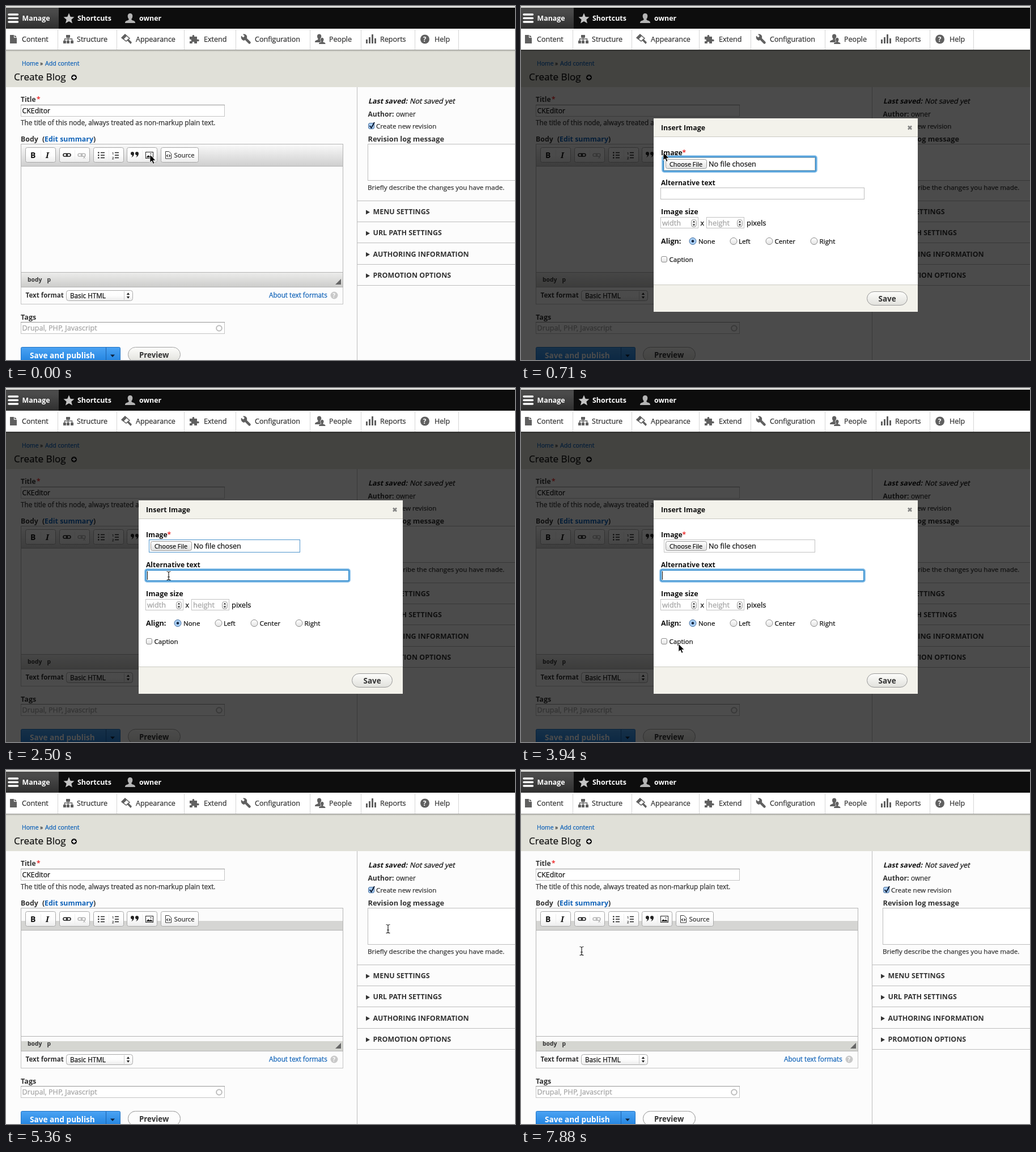
An HTML page that plays this animation: 898 px wide and 624 px high, repeating every 8000 ms.

```html
<!DOCTYPE html>
<html lang="en">
<head>
<meta charset="utf-8">
<title>Insert image dialog</title>
<style>
  html, body { margin: 0; width: 100%; height: 100%; overflow: hidden; background: #fcfcfc; }
  svg { display: block; }
  text {
    font-family: "Open Sans", "Noto Sans", sans-serif; white-space: pre;
    color: #333; fill: currentColor; stroke: currentColor; stroke-width: .25px;
  }
  .b { font-weight: 700; stroke: none; }
  .k { color: #111; }
  .w { color: #fff; }
  .link { color: #0f62b8; }
  .hint { color: #a3a3a3; }
  .req { color: #e33; }
</style>
</head>
<body>
<svg id="stage" width="898" height="624" viewBox="0 0 898 624"></svg>
<script>
const text = (x, y, size, str, cls = '', extra = '') =>
  `<text x="${x}" y="${y}" font-size="${size}" class="${cls}" ${extra}>${str}</text>`;
const bold = (x, y, size, str, cls = '') => text(x, y, size, str, 'b ' + cls);
const slant = (x, y, size, str, cls) => text(0, 0, size, str, cls, `transform="translate(${x} ${y}) skewX(-13)"`);
const rect = (x, y, w, h, fill, extra = '') =>
  `<rect x="${x}" y="${y}" width="${w}" height="${h}" fill="${fill}" ${extra}/>`;
// bordered box whose 1px outline sits on whole pixels
const box = (x, y, w, h, fill, stroke, r = 0) =>
  rect(x + .5, y + .5, w - 1, h - 1, fill, `stroke="${stroke}" rx="${r}"`);
const path = (d, fill = 'none', extra = '') => `<path d="${d}" fill="${fill}" ${extra}/>`;
const line = (d, stroke, w = 1, extra = '') => path(d, 'none', `stroke="${stroke}" stroke-width="${w}" ${extra}`);
const circle = (x, y, r, fill, extra = '') => `<circle cx="${x}" cy="${y}" r="${r}" fill="${fill}" ${extra}/>`;
const group = (id, body) => `<g id="${id}">${body}</g>`;
const grad = (id, ...stops) => `<linearGradient id="${id}" x2="0" y2="1">` +
  stops.map(([at, c]) => `<stop offset="${at}" stop-color="${c}"/>`).join('') + '</linearGradient>';

const field = (x, y, w, h) => box(x, y, w, h, '#fff', '#c4c4c4') + line(`M${x} ${y + .5}h${w}`, '#969696');
const glow = (x, y, w, h) =>
  rect(x - 1, y - 1, w + 2, h + 2, 'none', 'stroke="#8fc3ea" stroke-width="4" rx="3"') +
  rect(x, y, w, h, 'none', 'stroke="#3f94d2" stroke-width="2" rx="1"');
const tick = (x, y) => line(`M${x + 2.5} ${y + 5}l3 3.8L${x + 11} ${y - 1}`, '#0b1b33', 2);
const checkbox = (x, y, on) => box(x, y, 11, 11, on ? '#a9cdf3' : 'url(#soft)', on ? '#4a6f9c' : '#8c8c8c', 2.5) + (on ? tick(x, y) : '');
const radio = (x, on) => circle(x, 414.5, 6, on ? '#a9cff5' : 'url(#soft)', `stroke="${on ? '#466f9f' : '#8c8c8c'}"`) +
  (on ? circle(x, 414.5, 2.3, '#10243e') : '');
const arrows = (x, y, s) => path(`M${x - s} ${y - 1.5}h${2 * s}l${-s} ${-s - 1}zM${x - s} ${y + 1.5}h${2 * s}l${-s} ${s + 1}z`, '#222');
const spinner = x => box(x, 376, 10, 14, 'url(#soft)', '#999', 4) + arrows(x + 5, 383, 2);

function topBar() {
  const nav = [[28, 'Content'], [125, 'Structure'], [229, 'Appearance'], [349, 'Extend'],
    [439, 'Configuration'], [570, 'People'], [660, 'Reports'], [756, 'Help']];
  const gray = '#606060';
  const person = (x, y, scale, c, extra = '') => path('M9 0c3 0 4.5 2 4.3 5c-.2 3-1.3 4-2 5c0 2 1.5 2 4 3c2 .8 2.7 1.8 2.7 4H0' +
    'c0-2.2.7-3.2 2.7-4c2.5-1 4-1 4-3c-.7-1-1.8-2-2-5C4.5 2 6 0 9 0z', c, `transform="translate(${x} ${y}) scale(${scale})" ${extra}`);
  const icons =
    path('M7 51h7v5h5v10H7zM15 51l4 4h-4z', gray) +
    path('M106 51h7v5h-7zM101 61h5v5h-5zM107 61h5v5h-5zM114 61h5v5h-5z', gray) +
    line('M109.5 55v6M103.5 61v-3h13v3', gray, 1.5) +
    line('M204 56l6-6 8 7-6 5z', gray, 1.5) + path('M204 56l6-6 3 3-6 6zM213 60l3-2 6 6-2 3z', gray) +
    path('M324 54h5c-2-4 5-4 3 0h5v5c5-2 5 5 0 3v4h-5c2-4-5-4-3 0h-5v-4c4 2 4-5 0-3z', gray) +
    line('M422 57l7.5 7.5', gray, 4.5, 'stroke-linecap="round"') +
    path('M415 52.5l3.5 3 2.5-2.5-3-3.2c4-1.2 8 1.8 7.2 6.2l-5 5c-3.5 0-6.500-4-5.2-8.5z', gray) +
    person(545, 49.5, .85, gray) + person(552, 56, .64, gray, 'stroke="#fff" stroke-width="2" paint-order="stroke"') +
    path('M635 59h3v7h-3zM640 55h3v11h-3zM645 50h3v16h-3zM650 57h3v9h-3z', gray) +
    circle(739, 58.5, 8, gray) + bold(735.7, 63, 12, '?', 'w');
  return rect(0, 0, 898, 3, '#dededb') + rect(0, 3, 898, 37, '#0d0d0d') + rect(0, 3, 93, 37, 'url(#tab)') +
    rect(0, 40, 898, 37, '#fff') +
    line('M91.5 41v36M195.5 41v36M314.5 41v36M405.5 41v36M536.5 41v36M626.5 41v36M721.5 41v36M798.5 41v36', '#d6d6d6') +
    line('M5 15h15.5M5 21.5h15.5M5 28h15.5', '#fff', 3.5, 'stroke-linecap="round"') +
    path('M111 12.5l2.7 6.5 6.8.5-5.2 4.4 1.7 6.7-6-3.6-6 3.6 1.7-6.7-5.2-4.4 6.8-.5z', '#c4c4c4') +
    person(210, 13, 1, '#b4b4b4') +
    bold(28.5, 26, 12.4, 'Manage', 'w') + bold(126, 26, 12.45, 'Shortcuts', 'w') + bold(235, 26, 12.4, 'owner', 'w') +
    icons + nav.map(([x, label]) => text(x, 62.5, 12.55, label)).join('');
}

function pageHeader() {
  return rect(0, 77, 898, 66, '#e0e0d8') + rect(0, 77, 898, 4, 'url(#shade)') +
    text(28, 105, 10.5, 'Home', 'link') + text(60, 105, 10.5, '»') + text(69, 105, 10.65, 'Add content', 'link') +
    text(14, 130.5, 17.1, 'Create Blog', 'k') +
    circle(120, 126, 5, '#111') + line('M117 126h6M120 123v6', '#fff', 1.8);
}

function editor() {
  const groups = [[34, 54], [94, 54], [154, 54], [213, 54], [273, 67]];
  const lines = [258.5, 263, 267.5];
  const chain = (x, c) => [0, 5.5].map(dx =>
    rect(x + dx, 260.2, 7.5, 4.8, 'none', `stroke="${c}" stroke-width="1.6" rx="2.4"`)).join('');
  const rows = x => lines.map(y => line(`M${x} ${y}h7`, '#222', 1.5)).join('');
  const picture = box(246, 257, 14, 12, '#fff', '#222') + path('M248 267v-1l3-3 2.5 2 2-1.5 3 2.5v1z', '#222') + circle(255.5, 260.5, 1, '#222');
  const pill = fill => box(215, 601, 93, 27, fill, '#a0a0a0', 13);
  const bars = rect(27, 244, 567, 38, 'url(#bar)') + rect(27, 470, 567, 25, 'url(#foot)') + pill('url(#pill)');
  const flatBars = rect(27, 244, 567, 38, 'url(#flatBar)') + rect(27, 470, 567, 25, 'url(#flatFoot)') + pill('#fdfdfd');
  return bold(26, 169, 12, 'Title') + bold(54, 169, 12, '*', 'req') +
    field(26, 174, 360, 21) + text(28.5, 189, 12.3, 'CKEditor', 'k') +
    text(26, 209.5, 11.83, 'The title of this node, always treated as non-markup plain text.') +
    bold(26, 238.5, 12.3, 'Body') + bold(64, 238.5, 12.4, '(') + bold(68, 238.5, 12.4, 'Edit summary', 'link') + bold(154, 238.5, 12.4, ')') +
    box(26, 243, 569, 283, '#fcfcfc', '#c4c4c4') + bars + group('flat', flatBars) +
    line('M26 243.5h569M26 282.5h569M26 469.5h569M26 495.5h569M26.5 243v252M594.5 243v252', '#b4b4b4') +
    groups.map(([x, w]) => box(x, 249, w, 27, 'url(#button)', '#a9a9a9', 3)).join('') +
    group('pressed', rect(240, 250, 26, 25, 'url(#down)')) +
    line('M61.5 254v17M121.5 254v17M181.5 254v17M240.5 254v17', '#eee') +
    bold(43, 267.5, 14, 'B', 'k') +
    text(70, 267.5, 14, 'I', 'b k', 'style="font-family:\'Noto Serif\',serif;font-style:italic"') +
    chain(101, '#222') + chain(127, '#b5b5b5') + line('M136 265l4 4M140 265l-4 4', '#b5b5b5') +
    rows(167) + lines.map(y => circle(163.3, y, 1.3, '#222')).join('') +
    rows(192) + text(187, 262, 6, '1') + text(187, 270, 6, '2') +
    path('M220 260a3 3 0 1 1 6 0q0 5-5 7q2-2 2-4q-3 0-3-3zM228 260a3 3 0 1 1 6 0q0 5-5 7q2-2 2-4q-3 0-3-3z', '#222') +
    picture +
    path('M281.5 256.5h6l4 4v8.5h-10z', '#fff', 'stroke="#333"') + line('M285.5 262l-2 2 2 2M287.5 262l2 2-2 2', '#222', 1.2) +
    text(296.5, 266.5, 11.3, 'Source') +
    bold(38, 486, 10.3, 'body') + bold(72.5, 486, 10.3, 'p') + path('M591 481v10h-10z', '#666') +
    bold(34.5, 514, 11.55, 'Text format') + box(106, 501, 118, 19, 'url(#button)', '#aaa', 4) +
    line('M208.5 503v15', '#ccc') + arrows(215.5, 510.5, 2.7) + text(113, 514.5, 11.7, 'Basic HTML', 'k') +
    text(464, 514, 11.72, 'About text formats', 'link') + circle(579, 510, 6.5, '#c9c9c9') + bold(576.3, 514, 10, '?', 'w') +
    bold(26, 552.5, 12.6, 'Tags') + field(26, 557, 360, 21) + text(28.5, 572, 12.65, 'Drupal, PHP, Javascript', 'hint') +
    circle(376, 568, 4.8, 'none', 'stroke="#bdbdbd" stroke-width="2"') +
    box(26, 601, 176, 30, 'url(#blue)', '#1e72c4', 2) + line('M176.5 602v22', '#1c62ad') +
    path('M184 614.5h8l-4 4.5z', '#0d2440') + bold(42, 621, 13.65, 'Save and publish', 'w') +
    bold(235, 619.5, 13.3, 'Preview');
}

function sidebar() {
  const sections = ['MENU SETTINGS', 'URL PATH SETTINGS', 'AUTHORING INFORMATION', 'PROMOTION OPTIONS'];
  return line('M619.5 143v481', '#bdbdbd') +
    slant(639, 172, 12.45, 'Last saved:', 'b k') + slant(712, 172, 12.55, 'Not saved yet', 'k') +
    bold(638.5, 194.5, 12.1, 'Author:') + text(688, 194.5, 11.8, 'owner') +
    checkbox(639, 206, true) + text(653, 216, 11.65, 'Create new revision') +
    bold(638.5, 238.5, 12.8, 'Revision log message') + box(638, 243, 270, 65, '#fff', '#bdbdbd') +
    text(638, 323.5, 11.65, 'Briefly describe the changes you have made.') +
    line('M619 343.5h279', '#bdbdbd') +
    sections.map((s, i) => {
      const y = 367 + i * 37.3;
      return path(`M635 ${y - 7.5}l7 4-7 4z`, '#333') + bold(647.5, y, 12.45, s) +
        line(`M619 ${Math.round(y + 13) + .5}h279`, '#bdbdbd');
    }).join('');
}

function dialog() {
  const aligns = [[303, 313, 'None'], [375, 384, 'Left'], [438, 447.5, 'Center'], [517, 526.5, 'Right']];
  return rect(0, 77, 898, 547, '#000', 'opacity=".7"') +
    rect(234, 198, 466, 341, '#fff') + rect(234, 198, 466, 32, '#f3f2eb') + rect(234, 492, 466, 47, '#f3f2eb') +
    line('M234 230.5h466M234 491.5h466', '#cbcac2') +
    bold(247, 219, 12.4, 'Insert Image', 'k') + line('M683 211.5l6 6M689 211.5l-6 6', '#858585', 2.6) +
    bold(247, 262.5, 12.3, 'Image', 'k') + bold(284.5, 262.5, 12, '*', 'req') +
    box(252, 267, 267, 23, '#fff', '#c2c2c2') +
    group('fileBlue', box(252, 267, 267, 23, 'none', '#4f95cc')) + group('fileGlow', glow(251, 266, 269, 25)) +
    box(255, 270, 73, 17, 'url(#soft)', '#999', 3) + text(262, 282.5, 10.9, 'Choose File', 'k') +
    text(331, 282.5, 12.65, 'No file chosen', 'k') +
    bold(247, 315.5, 12.1, 'Alternative text', 'k') + box(246, 320, 360, 21, '#fff', '#bdbdbd') +
    group('altGlow', glow(247, 321, 358, 19)) + group('caret', rect(249, 323, 1, 15, '#000')) +
    bold(247, 367, 12.6, 'Image size', 'k') +
    box(246, 372, 67, 20, '#fff', '#c2c2c2') + box(327, 372, 67, 20, '#fff', '#c2c2c2') +
    text(249, 387, 12.7, 'width', 'hint') + text(330, 387, 12.9, 'height', 'hint') + spinner(300) + spinner(381) +
    text(316.5, 387, 12.5, 'x', 'k') + text(398, 387, 12.9, 'pixels', 'k') +
    bold(247, 418.5, 12.6, 'Align:', 'k') +
    aligns.map(([cx, x, s], i) => radio(cx, i === 0) + text(x, 418.5, 11.65, s, 'k')).join('') +
    checkbox(247, 441, false) + group('checked', checkbox(247, 441, true)) + text(261.5, 450.5, 11.65, 'Caption', 'k') +
    box(610, 503, 72, 25, 'url(#pill)', '#999', 12.5) + bold(630.5, 521, 13.5, 'Save');
}

const defs = '<defs>' +
  grad('tab', [.2, '#4a4a4a'], [1, '#2f2f2f']) + grad('shade', [0, '#8c8c88'], [.4, '#c4c4bd'], [1, '#e0e0d8']) +
  grad('bar', [0, '#fafafa'], [.15, '#f3f3f3'], [1, '#cfcfcf']) + grad('foot', [0, '#ececeb'], [1, '#cdcdcb']) +
  grad('flatBar', [.57, '#fbfbfb'], [.57, '#d5d5d3']) + grad('flatFoot', [.34, '#fbfbfb'], [.34, '#d5d6d1']) +
  grad('button', [0, '#fff'], [.5, '#fdfdfd'], [1, '#ececec']) + grad('down', [0, '#c9c9c9'], [1, '#dedede']) +
  grad('soft', [0, '#fff'], [1, '#e2e2e2']) + grad('pill', [0, '#fdfdfb'], [1, '#e1e1dc']) +
  grad('blue', [0, '#4ba3f3'], [1, '#1c7fdd']) + '</defs>';

const arrow = path('M0 0V14L3.2 11 5.5 16.3 7.9 15.3 5.7 10.2H10Z', '#000', 'stroke="#fff" stroke-width=".8"');
const beam = line('M-3.5-7.5q3 0 3.5 1.5q.5-1.5 3.5-1.5M0-6V6M-3.5 7.5q3 0 3.5-1.5q.5 1.5 3.5 1.5M-2 2h4', '#222', 1.2);

const stage = document.getElementById('stage');
stage.innerHTML = defs + rect(0, 0, 898, 624, '#fcfcfc') + pageHeader() + editor() + sidebar() +
  group('dialog', dialog()) + topBar() + group('cursor', group('arrow', arrow) + group('beam', beam));

// pointer stops: start time, x, y, shape
const stops = [
  [0, 254, 262, 'arrow'], [360, 251, 258, 'arrow'], [1430, 279, 274, 'arrow'], [2140, 292, 330, 'beam'],
  [2500, 287, 331, 'beam'], [3220, 293, 389, 'beam'], [3580, 278, 451, 'arrow'], [4650, 502, 499, 'arrow'],
  [5010, 595, 413, 'arrow'], [5360, 674, 280, 'beam'], [5720, 337, 320, 'beam'], [6080, 102, 345, 'beam'],
  [7520, 102, 339, 'beam'], [7880, 107, 319, 'beam']
];
// visible intervals of each switched part
const spans = {
  pressed: [[360, 710]], dialog: [[710, 5360]], fileGlow: [[710, 2500]], fileBlue: [[2500, 2860]],
  altGlow: [[2500, 4290]], caret: [[2500, 3220], [3940, 4290]], checked: [[4290, 5360]], flat: [[5360, 8000]]
};
const part = id => document.getElementById(id);
const show = (id, on) => part(id).setAttribute('display', on ? 'inline' : 'none');

function draw(now) {
  const t = now % 8000;
  for (const id in spans) show(id, spans[id].some(([a, b]) => t >= a && t < b));
  const [, x, y, shape] = stops.filter(s => s[0] <= t).pop();
  part('cursor').setAttribute('transform', `translate(${x} ${y})`);
  show('arrow', shape === 'arrow');
  show('beam', shape === 'beam');
  requestAnimationFrame(draw);
}
draw(0);
</script>
</body>
</html>
```
